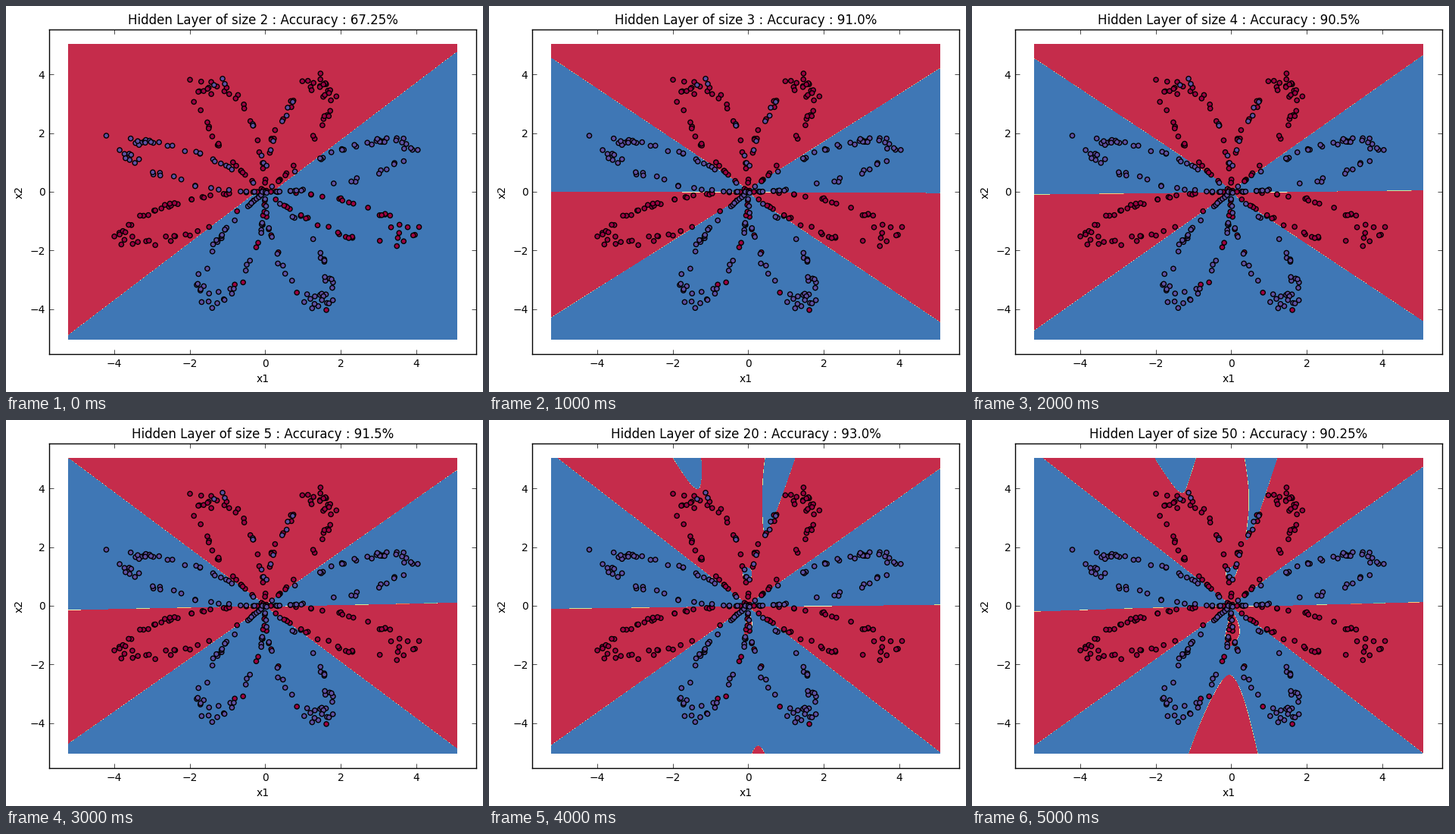
Write a matplotlib script that moves like this. It is 630 by 509 pixels and loops after 6000 ms.

```python
import numpy as np
import matplotlib.pyplot as plt
from matplotlib.animation import FuncAnimation

W, H, DPI = 630, 509, 100
SIZES = [2, 3, 4, 5, 20, 50]
STEPS, RATE = 10000, 1.2

plt.rcParams.update({
    "font.family": "DejaVu Sans", "font.size": 10, "text.kerning_factor": 6,
    "axes.linewidth": 1.0, "axes.titlesize": 12,
    "axes.titlepad": 5, "axes.labelpad": 5,
    "xtick.direction": "in", "ytick.direction": "in",
    "xtick.top": True, "ytick.right": True,
    "xtick.major.size": 4, "ytick.major.size": 4,
    "xtick.major.width": 0.5, "ytick.major.width": 0.5,
    "xtick.major.pad": 4, "ytick.major.pad": 4,
})


def flower(m=400, petal=4):
    """Noisy rose curve, one class per half turn."""
    np.random.seed(1)
    half = m // 2
    parts = []
    for j in range(2):
        t = np.linspace(j * 3.12, (j + 1) * 3.12, half) + np.random.randn(half) * 0.2
        r = petal * np.sin(4 * t) + np.random.randn(half) * 0.2
        parts.append(np.array([r * np.sin(t), r * np.cos(t)]))
    return np.hstack(parts), np.repeat([0, 1], half)[None, :]


def train(X, Y, hidden):
    """One tanh layer and a sigmoid output, plain gradient descent."""
    np.random.seed(2)
    m = X.shape[1]
    W1 = np.random.randn(hidden, 2) * 0.01
    W2 = np.random.randn(1, hidden) * 0.01
    b1, b2 = np.zeros((hidden, 1)), np.zeros((1, 1))
    for _ in range(STEPS):
        A1 = np.tanh(W1 @ X + b1)
        A2 = 1 / (1 + np.exp(-(W2 @ A1 + b2)))
        d2 = A2 - Y
        d1 = (W2.T @ d2) * (1 - A1 * A1)
        W2 = W2 - RATE * (d2 @ A1.T) / m
        b2 = b2 - RATE * d2.mean(axis=1, keepdims=True)
        W1 = W1 - RATE * (d1 @ X.T) / m
        b1 = b1 - RATE * d1.mean(axis=1, keepdims=True)
    return W1, b1, W2, b2


def classify(net, x, y):
    """Class 0 or 1 for broadcastable coordinates x and y."""
    W1, b1, W2, b2 = net
    z = b2[0, 0]
    for (wx, wy), b, w in zip(W1, b1[:, 0], W2[0]):
        z = z + w * np.tanh(wx * x + b + wy * y)
    return (z > 0).astype(float)


def padded(v):
    gap = 0.05 * (v[-1] - v[0])
    return v[0] - gap, v[-1] + gap


X, Y = flower()
xs, ys = (np.arange(v.min() - 1, v.max() + 1, 0.01) for v in X)

fig = plt.figure(figsize=(W / DPI, H / DPI), dpi=DPI, facecolor="white")
ax = fig.add_axes([57 / W, 50 / H, 564 / W, 428 / H])

levels = np.arange(8) * 0.15
regions, scores = [], []
for size in SIZES:
    net = train(X, Y, size)
    regions.append(ax.contourf(xs, ys, classify(net, xs[None, :], ys[:, None]),
                               levels=levels, cmap="Spectral"))
    scores.append(100 * np.sum(classify(net, *X) == Y[0]) / Y.size)
ax.scatter(X[0], X[1], c=Y[0], s=20, cmap="Spectral",
           edgecolors="black", linewidths=1.0, zorder=2)

ax.set_xlim(padded(xs))
ax.set_ylim(padded(ys))
ax.set_xticks(range(-4, 5, 2))
ax.set_yticks(range(-4, 5, 2))
ax.set_xlabel("x1")
ax.set_ylabel("x2")
title = ax.set_title("")


def update(i):
    for k, region in enumerate(regions):
        region.set_visible(k == i)
    title.set_text(f"Hidden Layer of size {SIZES[i]} : Accuracy : {scores[i]}%")
    return [*regions, title]


anim = FuncAnimation(fig, update, frames=len(SIZES), interval=1000,
                     repeat=True, repeat_delay=0, blit=False)
plt.show()
```
